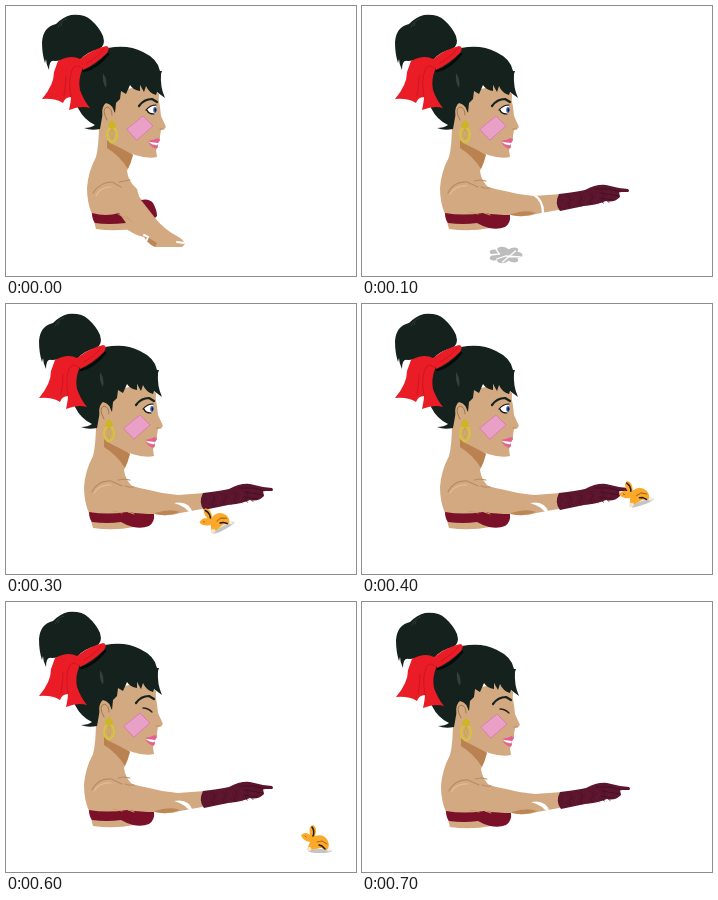
Recreate the animation shown at these times as an HTML page with a canvas. Size 350 px wide and 270 px high, loop 0.8 s.

```html
<!DOCTYPE html>
<html lang="en">
<head>
<meta charset="utf-8">
<title>Pointing</title>
<style>
html, body { margin: 0; width: 100%; height: 100%; overflow: hidden; background: #fff; }
canvas { display: block; width: 350px; height: 270px; }
</style>
</head>
<body>
<canvas id="stage" width="350" height="270"></canvas>
<script>
const ctx = document.getElementById('stage').getContext('2d');
const STEP = 100, STEPS = 8;
const SKIN = '#d2a981', SHADE = '#b98250', HAIR = '#14211c', RED = '#ea1c26',
      WINE = '#7b1029', GLOVE = '#5b162e', GOLD = '#d8c62f', ORANGE = '#fba92b';

function fill(d, color) {
  ctx.fillStyle = color;
  ctx.fill(new Path2D(d));
}
function line(d, color, width = 1) {
  ctx.strokeStyle = color;
  ctx.lineWidth = width;
  ctx.stroke(new Path2D(d));
}
function oval(x, y, rx, ry, color, turn = 0) {
  ctx.fillStyle = color;
  ctx.beginPath();
  ctx.ellipse(x, y, rx, ry, turn, 0, Math.PI * 2);
  ctx.fill();
}
function at(x, y, draw, turn = 0) {
  ctx.save();
  ctx.translate(x, y);
  ctx.rotate(turn);
  draw();
  ctx.restore();
}

function torso() {
  fill('M90 116Q90 140 87 151Q79 166 78 182Q78 197 83 208L87 223Q108 226 128 222L135 208L128 183Q119 175 118 165L124 148L100 128Z', SKIN);
  fill('M98 134L124 149Q122 157 119 163Q111 150 98 142Z', SHADE);
}

function armOut(step) {
  fill('M112 176Q126 182 143 185Q157 189 172 190L199 188L201 203Q185 206 174 208Q162 212 149 209L120 209L90 210L84 200Z', SKIN);
  fill('M149 208Q164 203 174 207Q162 212 149 209Z', '#bc8755');
  line('M86 187Q92 175 105 176L116 181', '#b98b62', 1.2);
  line('M88 188Q94 179 105 180', '#dfbd99', 1.2);
  line('M112 175Q118 173 124 175M119 181Q123 183 128 182', '#b98b62');
  fill('M83 207Q101 210 121 207Q136 209 148 209Q149 217 143 221Q136 224 127 222Q120 220 115 217Q101 219 86 217Q83 213 83 207Z', WINE);
  line('M107 206L116 208M122 207L128 209', '#c99d62');
  if (step === 1) line('M172 189Q181 194 181 207', '#fff', 2.4);
  else if (step === 2) line('M167 190Q179 194 183 207', '#fff', 2.4);
  else fill('M168 198Q183 195 187 208Q182 207 179 203Q175 200 168 198Z', '#fff');
  glove();
}

function glove() {
  fill('M197 188Q214 186 223 184Q234 178 244 179L257 182L266 183Q268 185 266 186L257 186L258 191Q252 197 244 195Q235 199 222 200L198 205Q192 198 197 188Z', GLOVE);
  for (let i = 0; i < 9; i++) {
    const x = 201 + i * 5.5, y = 191 - i * 0.7;
    line(`M${x} ${y}q4 3 1 6q-3 3 1 5`, i % 2 ? '#48102a' : '#6d1a38', 0.8);
  }
  line('M233 183L248 183L258 186M239 187L257 190M238 192L251 194', '#420e26', 0.9);
}

// Stage coordinates: the lowered arm does not share the body's shift.
function armDown() {
  fill('M83 190Q90 174 107 174Q116 175 123 180L135 193L149 212Q159 224 171 230Q177 233 179 238L176 241L149 241L145 237L141 236L138 231Q128 229 119 222L92 204Z', SKIN);
  fill('M138 229L151 237L149 241L145 239L141 235Z', '#bc8755');
  line('M138 229L142 231L140 236M171 236L178 237', '#fff', 2);
  line('M87 187Q94 176 106 176L115 181M113 176L124 174', '#b98b62', 1.2);
  line('M90 190Q94 181 105 181', '#dfbd99', 1.2);
  fill('M86 207Q100 211 113 207L120 217Q102 219 89 217Q86 213 86 207Z', WINE);
  fill('M135 194Q143 192 147 197Q151 204 151 210L149 212Z', WINE);
  line('M112 208L121 213M120 210L126 216', '#c99d62');
}

function hair() {
  fill('M47 18Q54 11 62 9Q76 8 82 14Q90 21 94 30Q97 40 90 43Q78 46 72 53L46 55Q40 53 40 64Q37 58 37 53L36 57Q33 48 33 36Q34 21 47 18Z', HAIR);
  line('M49 21Q52 14 58 13M52 20L53 17', '#34413a', 0.8);
  fill('M68 57Q82 46 99 42Q119 38 134 46Q149 53 151 65L153 65L152 68Q151 81 156 92L148 86L147 89Q140 87 137 80L135 86L131 79L131 85Q124 84 121 79L117 88L112 85L111 93L107 97L106 107L101 99Q95 97 94 106L91 123Q82 125 75 122Q82 122 86 119Q75 114 69 102L64 83Z', HAIR);
  fill('M94 67Q99 74 97 82Q93 77 94 67Z', '#344039');
}

function bow() {
  line('M75 65Q88 62 99 48', '#050b08', 2.5);
  fill('M71 53Q84 43 97 40Q102 41 98 47Q87 58 74 64Z', RED);
  fill('M49 55Q62 48 71 53Q76 57 73 64Q69 74 71 84Q75 95 81 102Q72 99 60 104Q62 95 62 91Q56 91 54 97Q46 92 33 93Q45 79 45 66Z', RED);
  line('M62 91Q59 74 63 64Q66 57 72 62M55 90Q57 79 57 70M78 57Q89 51 95 43', '#c7141f', 0.8);
}

function eye(closed) {
  line('M130 100Q135 93 143 93L148 96', HAIR, 2.2);
  if (closed) {
    line('M137 105Q142 105 146 109', '#2a211d', 1.3);
    return;
  }
  fill('M138 104Q141 99 147 100L148 106Q143 110 138 104Z', '#fff');
  oval(146, 104, 1.8, 3, '#3f63b0');
  oval(146.4, 104, 0.9, 1.7, '#10182a');
  line('M137 104Q141 99 147 99M138 104Q139 108 145 108', '#17191a', 1.2);
}

function head(closed) {
  fill('M106 86L136 79L150 88Q149 94 151 101L152 110L157 121Q156 123 152 124L151 130L151 134L149 137L149 141L147 144L148 151Q139 153 126 149L101 137L90 124L92 106Q96 97 106 97Z', SKIN);
  hair();
  bow();
  fill('M96 116Q90 103 97 97Q104 98 106 109Q104 116 99 117Z', SKIN);
  line('M98 114Q92 103 98 101Q103 102 103 109', '#a97649');
  fill('M118 123L134 110L144 120L128 134Z', '#e8a0c6');
  line('M118 123L134 110L144 120L128 134Z', '#e07bb2');
  eye(closed);
  fill('M139 135Q145 134 149 132L151 134L149 137Q143 137 139 135Z', '#e55e98');
  fill('M140 136L149 137L148 139.5Q143 139 140 136Z', '#fff');
  fill('M139 136.5Q144 140 149 139.5Q149 142.5 146 142.5Q142 141 139 136.5Z', '#e55e98');
  line('M151 123L155 123', '#b98250', 0.8);
  earring();
}

function earring() {
  ctx.strokeStyle = GOLD;
  ctx.lineWidth = 1.8;
  ctx.beginPath();
  ctx.ellipse(103, 128.5, 5, 7.5, 0, 0, Math.PI * 2);
  ctx.stroke();
  line('M103 123Q100 128 103 133Q106 128 103 123', '#c5a928', 0.8);
  fill('M99 118L103 114L107 118L106 122L100 122Z', '#cdb624');
}

function smoke() {
  for (let i = 0; i < 7; i++) {
    const a = i * Math.PI * 2 / 7;
    oval(11 * Math.cos(a), 5 * Math.sin(a), 6, 3.2, '#bdbdbd', 0.3 * Math.sin(a * 2));
  }
  oval(0, 0, 9, 6, '#bdbdbd');
  line('M-16 0L-6 -1L-9 -5M-9 4L0 1L15 2M-3 7L3 2L10 -4', '#fff', 1.3);
}

function puffBunny() {
  oval(0, 2, 10, 6.5, '#c9c9c9');
  oval(0, 1, 8.5, 6, '#fff');
  fill('M-9 2Q-10 -5 -4 -7L0 -6L4 -8Q10 -3 9 3L4 5L1 2L-3 5Z', ORANGE);
  line('M2 -6L0 -2L2 0L-1 4M-4 3L0 4', '#211a18', 1.5);
  line('M-6 -3L-3 -4M6 -2L5 2', '#fff', 1.2);
}

function bunny() {
  oval(4, 11, 12, 2, '#c4c4c4');
  fill('M-15 -5Q-10 -9 -6 -5Q-8 -14 -3 -15Q2 -12 -1 -4Q8 -7 12 1Q14 7 11 10L5 8L-5 10L-8 7L-6 2Q-13 1 -15 -5Z', ORANGE);
  line('M-4 -13Q-1 -9 -3 -4M3 5L6 6L9 9', '#211a18', 1.5);
  line('M-11 -4L-10 -3M1 2L6 1L11 4', '#a45e1c', 0.9);
  oval(-7, 9, 2.5, 2, '#f5e6d0');
  oval(13, 10, 2.2, 1.6, '#eee');
}

function prop(step) {
  if (step === 1) at(143.5, 249, smoke);
  if (step === 2) at(145, 247, puffBunny);
  if (step === 3) at(209, 216, bunny, -0.5);
  if (step === 4) at(273, 190, bunny, -0.35);
  if (step === 5) at(293, 214, bunny, -0.15);
  if (step === 6) at(310, 238, bunny);
}

function draw(step) {
  ctx.fillStyle = '#fff';
  ctx.fillRect(0, 0, 350, 270);
  const dx = step === 0 ? 3 : step === 7 ? 1 : 0;
  const dy = step < 2 ? 0 : step === 7 ? 2 : 1;
  const closed = step === 2 || step > 5;
  at(dx, dy, () => {
    torso();
    if (step) armOut(step);
  });
  if (!step) armDown();
  at(dx, dy, () => head(closed));
  prop(step);
}

ctx.lineJoin = ctx.lineCap = 'round';
const start = performance.now();
function tick() {
  draw(Math.floor((performance.now() - start) / STEP) % STEPS);
  requestAnimationFrame(tick);
}
tick();
</script>
</body>
</html>
```
